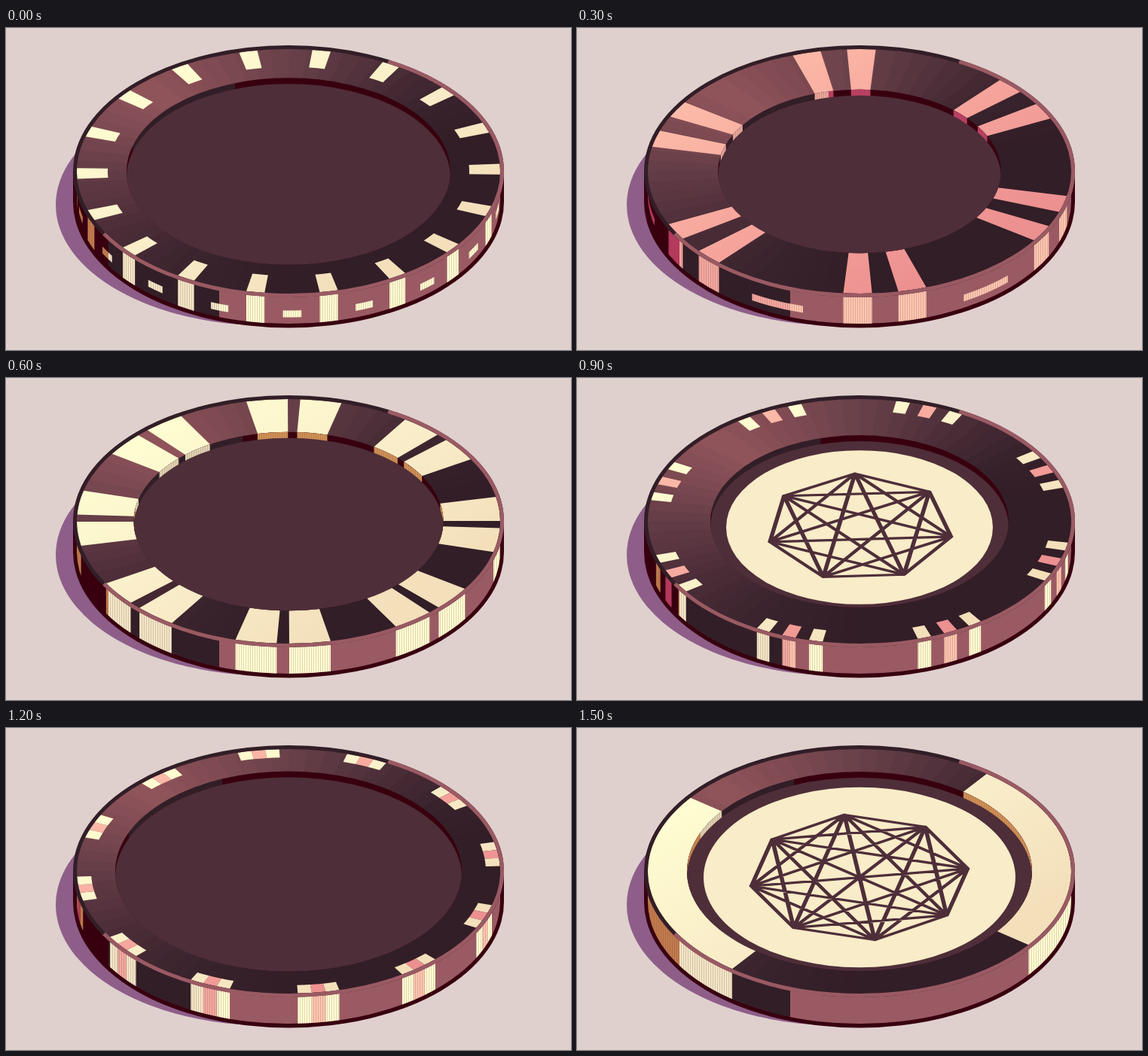
An HTML page for the animation above (1800 ms loop, 750 by 428 pixels).

```html
<!DOCTYPE html>
<html lang="en">
<head>
<meta charset="utf-8">
<title>Casino chip designs</title>
<style>
  html, body { margin: 0; width: 100%; height: 100%; overflow: hidden; background: #dfd0cd; }
  svg { display: block; width: 100%; height: 100%; }
  .design { visibility: hidden; animation: show 1800ms step-end infinite; }
  @keyframes show {
    0% { visibility: visible; }
    16.666%, 100% { visibility: hidden; }
  }
</style>
</head>
<body>
<svg id="stage" viewBox="0 0 750 428"></svg>
<script>
const CX = 375, CY = 190.5, TILT = 0.5783;
const EDGE = 281, HEIGHT = 40, DEPTH = 8;
const DARK = '#321e27', MAROON = '#38000f', ROSE = '#9a5a63', FLOOR = '#4e2e39', CREAM = '#f9ecc8';

// Each inlay: top = gradient over the face, side and wall = colour per light zone.
const INLAYS = {
  cream: { top: ['#ffffd2', '#f9ecc8', '#f3dfba'], side: ['#c07a4c', '#f2e6c6', '#fffdd2'], wall: ['#c98750', '#e0d3b4', '#cf9055'] },
  pink: { top: ['#fdbda9', '#f5a39b', '#ec9090'], side: ['#b7395f', '#f2a79f', '#fdc5af'], wall: ['#b7395f', '#e9a69b', '#bd3f64'] }
};

// Parts are [from, to, inlay] in degrees around each repeated centre.
const DESIGNS = [
  { hole: 215, count: 18, start: -1, inner: 240, parts: [[-2.5, 2.5, 'cream']], dash: [7.5, 12.5, 'cream'] },
  { hole: 188, count: 6, start: 23, parts: [[-11.4, -3.6, 'pink'], [3.6, 11.4, 'pink']], dash: [22.5, 37.5, 'pink'] },
  { hole: 205.5, count: 8, start: 1.5, parts: [[-13, -1.7, 'cream'], [1.7, 13, 'cream']] },
  { hole: 198, count: 8, start: 19.5, inner: 254, parts: [[-9.5, -5.7, 'cream'], [-1.9, 1.9, 'pink'], [5.7, 9.5, 'cream']],
    star: { points: 7, radius: 123.5, start: -92.8, disc: 177 } },
  { hole: 230, count: 12, start: -8.2, inner: 262, parts: [[-5.7, -1.9, 'cream'], [-1.9, 1.9, 'pink'], [1.9, 5.7, 'cream']] },
  { hole: 229, count: 2, start: -8, parts: [[-45, 45, 'cream']],
    star: { points: 8, radius: 145, start: -8, disc: 207 } }
];

const range = n => [...Array(n).keys()];
const rad = deg => deg * Math.PI / 180;
const point = (r, deg, z = 0) =>
  `${(CX + r * Math.cos(rad(deg))).toFixed(2)} ${(CY + z + r * TILT * Math.sin(rad(deg))).toFixed(2)}`;
const arc = (r, deg, z, sweep) => `A${r} ${r * TILT} 0 0 ${sweep} ${point(r, deg, z)}`;

const sector = (r0, r1, a, b) =>
  `M${point(r0, a)}L${point(r1, a)}${arc(r1, b, 0, 1)}L${point(r0, b)}${arc(r0, a, 0, 0)}Z`;
const band = (r, a, b, z0, z1) =>
  `M${point(r, a, z0)}${arc(r, b, z0, 1)}L${point(r, b, z1)}${arc(r, a, z1, 0)}Z`;

const shape = (d, fill) => `<path d="${d}" fill="${fill}"/>`;
const lined = (d, fill) => shape(d, fill) + shape(d, 'url(#lines)');
const disc = (r, z, attrs) => `<ellipse cx="${CX}" cy="${CY + z}" rx="${r}" ry="${r * TILT}" ${attrs}/>`;

// Hard-edged horizontal zones: left of x0, between, right of x1.
const zones = (id, colors, x0, x1) =>
  `<linearGradient id="${id}" gradientUnits="userSpaceOnUse" x1="0" y1="0" x2="750" y2="0">` +
  [[0, 0], [x0, 0], [x0, 1], [x1, 1], [x1, 2], [750, 2]]
    .map(([x, i]) => `<stop offset="${x / 750}" stop-color="${colors[i]}"/>`).join('') +
  '</linearGradient>';

const faceGradient = (id, colors) =>
  `<linearGradient id="${id}" gradientUnits="userSpaceOnUse" x1="150" y1="69" x2="354" y2="403">` +
  colors.map((c, i) => `<stop offset="${[0, 0.57, 1][i]}" stop-color="${c}"/>`).join('') +
  '</linearGradient>';

function shadedRing() {
  const stops = [
    [0, 50, 30, 39], [90, 50, 30, 39], [120, 57, 35, 44], [150, 76, 45, 56], [180, 99, 60, 70],
    [205, 128, 75, 83], [225, 145, 84, 91], [245, 129, 75, 83], [270, 105, 65, 73],
    [300, 74, 45, 55], [325, 54, 33, 42], [345, 50, 30, 39], [360, 50, 30, 39]
  ];
  const step = 5;
  return range(360 / step).map(i => {
    const a = i * step, mid = a + step / 2;
    const k = stops.findIndex(s => s[0] > mid);
    const [p, q] = [stops[k - 1], stops[k]];
    const t = (mid - p[0]) / (q[0] - p[0]);
    const rgb = [1, 2, 3].map(c => Math.round(p[c] + (q[c] - p[c]) * t));
    return shape(sector(150, EDGE + 1, a, a + step + 0.4), `rgb(${rgb})`);
  }).join('');
}

function sideBand(a, b, inlay, z0, z1) {
  const from = Math.max(a, 0), to = Math.min(b, 180);
  return from < to ? lined(band(EDGE, from, to, z0, z1), `url(#${inlay}-side)`) : '';
}

function starDisc({ points, radius, start, disc: size }) {
  const corner = i => {
    const a = rad(start + i * 360 / points);
    return `${(radius * Math.cos(a)).toFixed(2)} ${(radius * Math.sin(a)).toFixed(2)}`;
  };
  let d = '';
  for (let i = 0; i < points; i++)
    for (let j = i + 1; j < points; j++) d += `M${corner(i)}L${corner(j)}`;
  return disc(size, DEPTH, `fill="${CREAM}"`) +
    `<path d="${d}" transform="translate(${CX} ${CY + DEPTH}) scale(1 ${TILT})"
      stroke="${FLOOR}" stroke-width="5.6" stroke-linecap="round"/>`;
}

function design(spec, i) {
  const { hole, count, start, inner = hole, parts, dash, star } = spec;
  const x0 = CX - hole * Math.min(0.99, 0.92 + 0.0027 * (230 - hole));
  const x1 = CX - 41 - (hole - 188) * 1.12;
  const clip = `hole${i}`;
  const defs = `<clipPath id="${clip}">${disc(hole, 0, '')}</clipPath>` +
    zones(`wall${i}`, [MAROON, DARK, MAROON], x0, x1) +
    Object.keys(INLAYS).map(n => zones(`${n}-wall${i}`, INLAYS[n].wall, x0, x1)).join('');

  let face = '', side = '', wall = '';
  for (const k of range(count)) {
    const mid = (start + k * 360 / count + 90) % 360 - 90;
    for (const [from, to, inlay] of parts) {
      const a = mid + from, b = mid + to;
      face += shape(sector(inner, EDGE, a, b), `url(#${inlay}-top)`);
      side += sideBand(a, b, inlay, 0, HEIGHT);
      if (inner === hole) wall += lined(band(hole, a, b, -1, DEPTH + 1), `url(#${inlay}-wall${i})`);
    }
    if (dash) side += sideBand(mid + dash[0], mid + dash[1], dash[2], 22.5, 31.5);
  }
  return `<g class="design" style="animation-delay:${(i - DESIGNS.length) * 300}ms">
    <defs>${defs}</defs>${side}${face}
    ${disc(hole, 0, `fill="url(#wall${i})"`)}
    <g clip-path="url(#${clip})">${wall}${disc(hole, DEPTH, `fill="${FLOOR}"`)}${star ? starDisc(star) : ''}</g>
  </g>`;
}

const RIM = [283.5, 165];
const rimPoint = deg => `${CX + RIM[0] * Math.cos(rad(deg))} ${CY + RIM[1] * Math.sin(rad(deg))}`;
const rim = `<g fill="none" stroke-width="5">
  <ellipse cx="${CX}" cy="${CY}" rx="${RIM[0]}" ry="${RIM[1]}" stroke="${DARK}"/>
  <path d="M${rimPoint(-62.2)}A${RIM} 0 1 1 ${rimPoint(149.8)}" stroke="${ROSE}"/>
</g>`;

document.getElementById('stage').innerHTML = `
  <defs>
    <pattern id="lines" width="3" height="8" patternUnits="userSpaceOnUse">
      <rect width="1" height="8" fill="#7a4a40" opacity=".22"/>
    </pattern>
    ${zones('side', [MAROON, DARK, ROSE], 136, 283)}
    ${Object.entries(INLAYS).map(([n, c]) => faceGradient(`${n}-top`, c.top) + zones(`${n}-side`, c.side, 136, 283)).join('')}
  </defs>
  <rect width="750" height="428" fill="#dfd0cd"/>
  <ellipse cx="347" cy="235" rx="281" ry="160.5" fill="#8e5e89"/>
  <path d="M89 ${CY}V231A286 167.5 0 0 0 661 231V${CY}Z" fill="${MAROON}"/>
  ${shape(band(EDGE, 0, 180, 0, HEIGHT), 'url(#side)')}
  ${shadedRing()}
  ${DESIGNS.map(design).join('')}
  ${rim}`;
</script>
</body>
</html>
```
